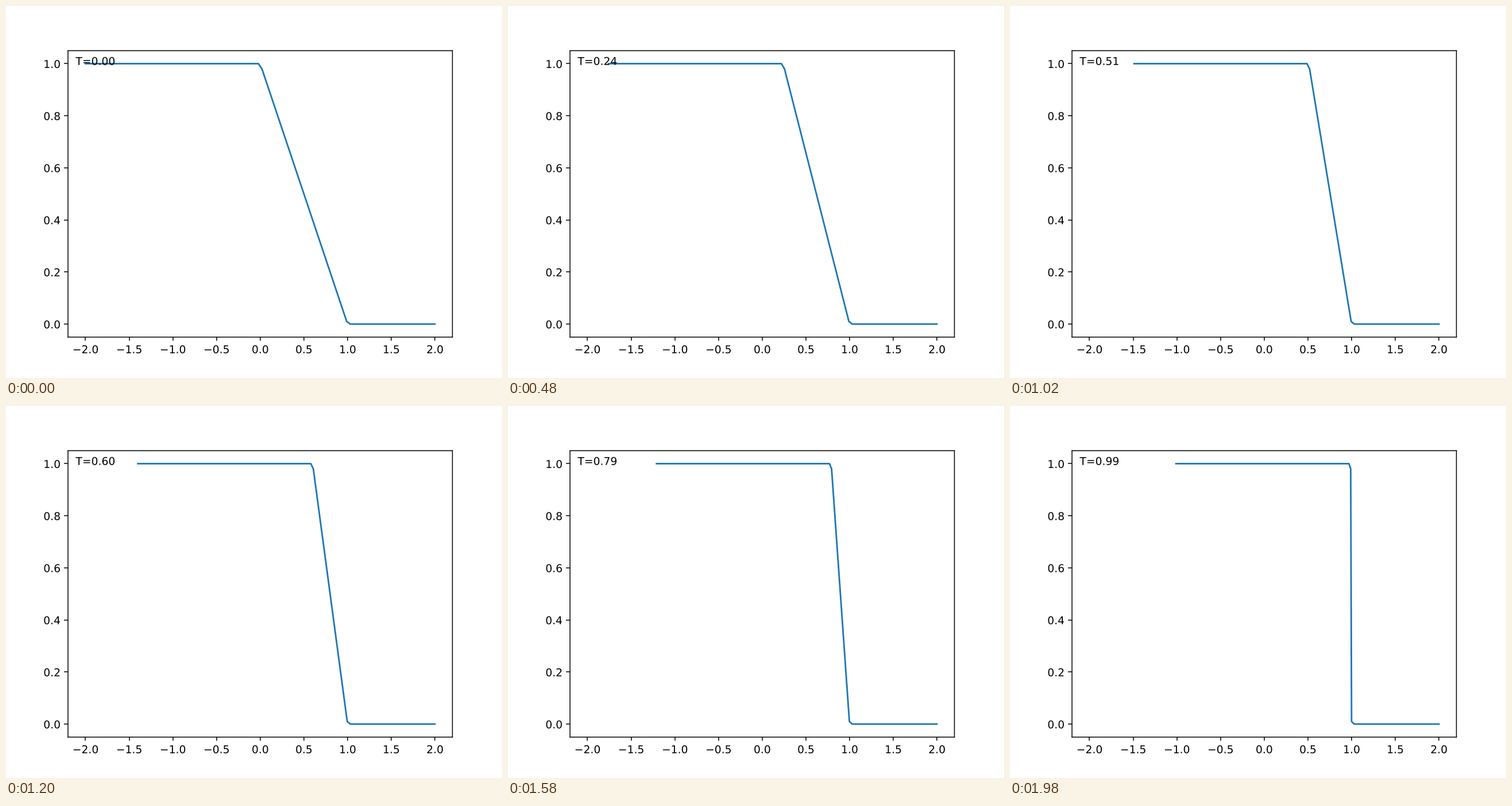
Write a matplotlib script that moves like this. It is 864 px wide and 648 px high and loops after 2000 ms.

```python
import numpy as np
import matplotlib.pyplot as plt
from matplotlib import patheffects
from matplotlib.animation import FuncAnimation

FRAMES = 100
INTERVAL = 20  # ms

# Keep lines and vector text at sub-pixel positions
plt.rcParams["path.snap"] = False
plt.rcParams["path.effects"] = [patheffects.Normal()]

# Inviscid Burgers equation: each point travels at its own height
x0 = np.linspace(-2, 2, 100)
u = np.clip(1 - x0, 0, 1)

fig, ax = plt.subplots(figsize=(6.4, 4.8), dpi=135)
ax.set_xlim(-2.2, 2.2)
ax.set_ylim(-0.05, 1.05)
line, = ax.plot(x0, u)
label = ax.text(0.02, 0.95, "", transform=ax.transAxes)


def update(frame):
    t = frame / FRAMES
    line.set_data(x0 + u * t, u)
    label.set_text(f"T={t:.2f}")
    return line, label


anim = FuncAnimation(fig, update, frames=FRAMES, interval=INTERVAL,
                     repeat=True, repeat_delay=0)
plt.show()
```
